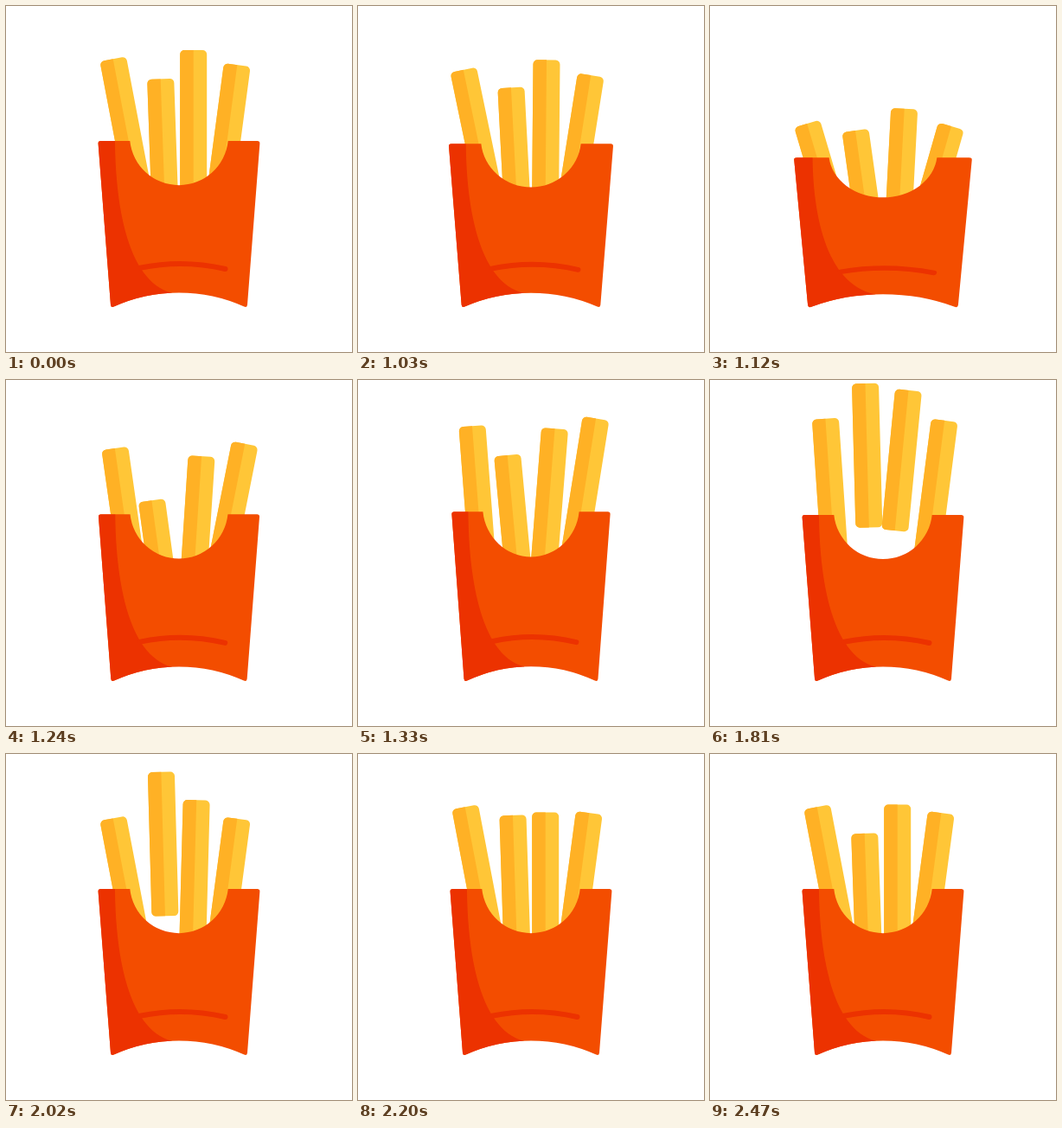
Recreate the animation shown at these times as an HTML page. Size 400 by 400 pixels, loop 2.5 s.

```html
<!DOCTYPE html>
<html lang="en">
<head>
<meta charset="utf-8">
<title>Fries</title>
<style>
  html, body { margin: 0; width: 100%; height: 100%; overflow: hidden; background: #fff; }
  svg { display: block; width: 100vw; height: 100vh; }
</style>
</head>
<body>
<svg viewBox="0 0 400 400">
  <defs>
    <path id="pack" d="M109.5 156H143.3A57 57 0 0 0 256.7 156H290.5Q293.6 156 293.4 159L279 345.5Q278.5 349.2 275.3 347.6Q240 331.5 200 331.5Q160 331.5 124.7 347.6Q121.5 349.2 121 345.5L106.6 159Q106.4 156 109.5 156Z"/>
    <clipPath id="packClip"><use href="#pack"/></clipPath>
  </defs>
  <g id="fries"></g>
  <g id="box">
    <use href="#pack" fill="#f34d00"/>
    <path d="M126 156C126.5 222 138 318 192 331.7V360H95V150H126Z" fill="#ec3200" clip-path="url(#packClip)"/>
    <path d="M155 302.8Q204 292.5 253.5 304" fill="none" stroke="#ec3200" stroke-width="6" stroke-linecap="round"/>
  </g>
</svg>
<script>
const LOOP = 2500, START = 1030, STEP = 30;
const DIP = 997, DEEP = 1120;
const SINK = 18;      // how far a landing fry drops below its resting place
const SQUASH = 0.1;

// Poses hold x and y of the top centre, then lean in degrees.
const fries = [
  { length: 166.5, rest: [123.7, 61.3, -10.8], deep: [112.2, 136, -16.5], top: [137.4, 30.5, -1],
    leap: 1120, peak: 1645, land: 1950, settle: 2150 },
  { length: 166.5, rest: [178.7, 84.4, -2], deep: [168, 144, -8], top: [179.5, 4, -1.5],
    leap: 1233, peak: 1839, land: 2277, settle: 2625 },
  { length: 163, rest: [216.7, 51, 0], deep: [224.7, 118.8, 3], top: [229.6, 11.5, 5.6],
    leap: 1175, peak: 1788, land: 2060, settle: 2800 },
  { length: 166.5, rest: [267.3, 68.2, 7.6], deep: [278.9, 139, 16], top: [274, 18.5, 7.2],
    leap: 1120, peak: 1645, land: 1900, settle: 2105 }
];

const swing = u => (1 - Math.cos(Math.PI * u)) / 2;
const slowing = u => 1 - (1 - u) ** 3;
const falling = u => u * u;
const span = (t, from, to) => Math.min(1, Math.max(0, (t - from) / (to - from)));
const mix = (a, b, u) => a.map((v, i) => v + (b[i] - v) * u);

function pose({ rest, deep, top, leap, peak, land, settle }, t) {
  if (t < DEEP) return mix(rest, deep, swing(span(t, DIP, DEEP)));
  if (t < peak) return mix(deep, top, slowing(span(t, leap, peak)));
  const sunk = [rest[0], rest[1] + SINK, rest[2]];
  if (t < land) return mix(top, sunk, falling(span(t, peak, land)));
  return mix(sunk, rest, swing(span(t, land, settle)));
}

// The box is pressed down, then springs back and rings out.
function press(t) {
  if (t < DEEP) return swing(span(t, DIP, DEEP));
  const u = span(t, DEEP, DEEP + 900);
  return u < 1 ? 2 ** (-10 * u) * Math.cos(4 * Math.PI * u) : 0;
}

const box = document.getElementById("box");
const layer = document.getElementById("fries");
layer.innerHTML = fries.map(({ length }) => `<g>
  <rect x="-15.5" width="31" height="${length}" rx="5" fill="#ffc637"/>
  <path d="M0 0H-10.5a5 5 0 0 0-5 5V${length - 5}a5 5 0 0 0 5 5H0Z" fill="#ffb125"/>
</g>`).join("");

function draw(time) {
  let t = time % LOOP;
  t = t < START ? 0 : START + Math.floor((t - START) / STEP) * STEP;
  fries.forEach((fry, i) => {
    const [x, y, lean] = pose(fry, t);
    layer.children[i].setAttribute("transform", `translate(${x} ${y}) rotate(${lean})`);
  });
  const s = SQUASH * press(t);
  box.setAttribute("transform",
    `translate(200 349) scale(${1 + s} ${1 - s}) translate(-200 -349)`);
}

let origin;
function tick(now) {
  origin ??= now;
  draw(now - origin);
  requestAnimationFrame(tick);
}
draw(0);
requestAnimationFrame(tick);
</script>
</body>
</html>
```
